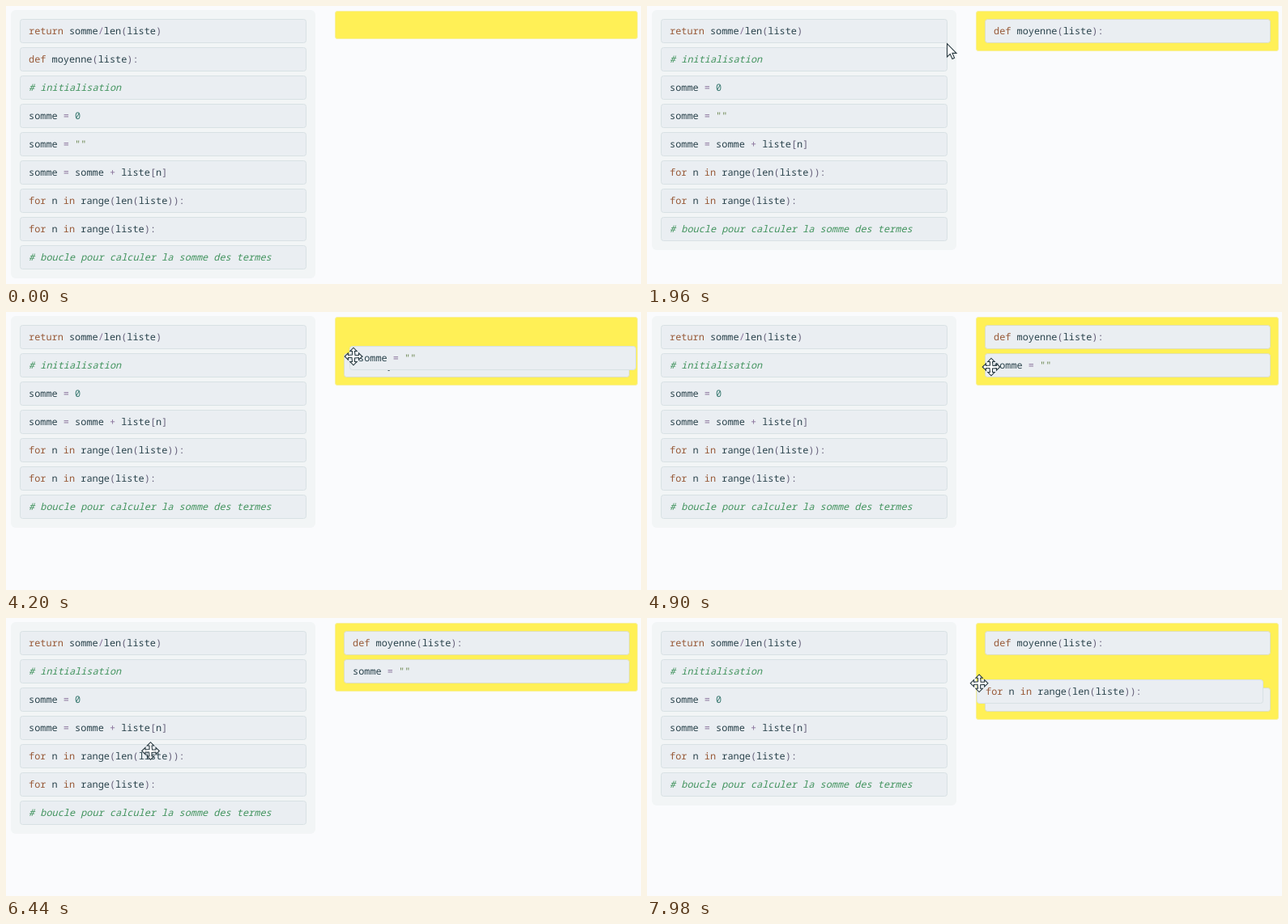
These frames come from a looping animation (784 by 344 pixels, 8 s). An HTML page:

```html
<!DOCTYPE html>
<html lang="fr">
<head>
<meta charset="utf-8">
<title>Puzzle de code</title>
<style>
html, body { margin: 0; width: 100%; height: 100%; overflow: hidden; background: #fafbfd; }
svg { display: block; width: 784px; height: 344px; }
text { font: 11.9px "Noto Sans Mono", "DejaVu Sans Mono", monospace; white-space: pre; fill: #2a434c; text-rendering: geometricPrecision; }
#bank { fill: #f2f5f6; }
#answer { fill: #fff056; stroke: #f8f09c; }
.card { fill: #eaeef2; stroke: #d8e1e4; }
.placed .card { stroke: #dfdfb8; }
.key { fill: #985a38; }
.note { fill: #43945f; font-style: italic; }
.num { fill: #37786f; }
.str { fill: #6b8650; }
.op { fill: #866f98; }
.par { fill: #66607a; }
.cursor { fill: #fff; stroke: #2a3b42; stroke-width: 1.1; }
</style>
</head>
<body>
<svg viewBox="0 0 784 344">
  <rect id="bank" x="6" y="5" width="376" rx="6"/>
  <rect id="answer" x="406.5" y="6.5" width="373" rx="2.5"/>
  <g id="cards"></g>
  <path id="move" class="cursor"/>
  <path id="arrow" class="cursor" d="M.5 .5V17L4.3 13.4L7 19.4L9.6 18.2L7 12.4H12Z"/>
</svg>
<script>
const NS = "http://www.w3.org/2000/svg";
const LOOP = 8000, STEP = 140;
const LEFT = 17, RIGHT = 417, TOP = 16, PITCH = 35, CARD_W = 354, CARD_H = 30;
const SWITCH_X = 230; // a dragged card joins the answer beyond this

const lines = [
  "return somme/len(liste)",
  "def moyenne(liste):",
  "# initialisation",
  "somme = 0",
  'somme = ""',
  "somme = somme + liste[n]",
  "for n in range(len(liste)):",
  "for n in range(liste):",
  "# boucle pour calculer la somme des termes"
];

// Pointer travels: it rests between them; "drag" names the card carried along
const travels = [
  { from: 280, until: 700, x: 24.5, y: 68 },
  { from: 980, until: 1680, x: 432, y: 35, drag: 1 },
  { from: 1680, until: 1960, x: 370, y: 46 },
  { from: 2100, until: 3080, x: 22.5, y: 134.5 },
  { from: 3220, until: 4200, x: 429, y: 55, drag: 4 },
  { from: 4200, until: 4900, x: 425, y: 68, drag: 4 },
  { from: 5320, until: 5740, x: 333.5, y: 156.5 },
  { from: 5740, until: 7140, x: 23.5, y: 172.5 },
  { from: 7140, until: 7280, x: 20.5, y: 160.5 },
  { from: 7420, until: LOOP, x: 411.5, y: 80.5, drag: 6 }
];
const entry = { x: 150, y: 140 };

const $ = id => document.getElementById(id);
const ease = p => p * p * (3 - 2 * p);
const rowY = i => TOP + PITCH * i;
const rowAt = y => Math.floor((y - TOP) / PITCH);
const place = (el, x, y) => el.setAttribute("transform", `translate(${x} ${y})`);

function add(parent, tag, attrs, content = "") {
  const el = document.createElementNS(NS, tag);
  for (const k in attrs) el.setAttribute(k, attrs[k]);
  el.textContent = content;
  return parent.appendChild(el);
}

const tokens = /(?<note>#.*)|(?<str>"[^"]*")|(?<num>\d+)|(?<key>\b(?:return|def|for|in)\b)|(?<op>[=+\/])|(?<par>[()[\]:]+)|(?<plain>\w+|\s+)/g;

const cards = lines.map(line => {
  const g = add($("cards"), "g", {});
  add(g, "rect", { class: "card", x: .5, y: .5, height: CARD_H - 1, rx: 3 });
  const text = add(g, "text", { x: 11, y: 19 });
  for (const m of line.matchAll(tokens)) {
    const kind = Object.keys(m.groups).find(k => m.groups[k] !== undefined);
    add(text, "tspan", { class: kind }, m[0]);
  }
  return g;
});

// One arrowhead, turned four times around the centre
let turn = [[-1.5, -2], [-1.5, -6.5], [-4.2, -6.5], [0, -10.8], [4.2, -6.5], [1.5, -6.5]];
const outline = [];
for (let i = 0; i < 4; i++) {
  outline.push(...turn);
  turn = turn.map(([x, y]) => [-y, x]);
}
$("move").setAttribute("d", "M" + outline.join("L") + "Z");

function pointer(t) {
  let pos = entry;
  for (const m of travels) {
    if (t <= m.from) break;
    const p = ease(Math.min(1, (t - m.from) / (m.until - m.from)));
    pos = { x: pos.x + (m.x - pos.x) * p, y: pos.y + (m.y - pos.y) * p };
  }
  return pos;
}

// Both lists and the carried card at time t
function layout(t) {
  const bank = [...lines.keys()], answer = [];
  let held = null;
  for (const id of new Set(travels.map(m => m.drag))) {
    const own = travels.filter(m => m.drag === id);
    const grab = own[0].from, drop = own[own.length - 1].until;
    if (id === undefined || t < grab) continue;
    const a = pointer(grab), b = pointer(Math.min(t, drop));
    const x = Math.round(LEFT + b.x - a.x);
    const y = Math.round(rowY(bank.indexOf(id)) + b.y - a.y);
    if (t < drop) held = { id, x, y };
    if (x < SWITCH_X) continue;
    bank.splice(bank.indexOf(id), 1);
    answer.splice(Math.max(0, rowAt(y)), 0, id);
  }
  return { bank, answer, held };
}

function overCard({ x, y }, bank, answer) {
  const row = rowAt(y);
  const over = (left, list) => x >= left && x < left + CARD_W && row >= 0 && row < list.length;
  return y - rowY(row) < CARD_H && (over(LEFT, bank) || over(RIGHT, answer));
}

function setCard(id, x, y, placed) {
  const card = cards[id];
  place(card, x, y);
  card.setAttribute("class", placed ? "placed" : "");
  card.firstChild.setAttribute("width", CARD_W - (placed ? 2 : 1));
}

function render(t) {
  const { bank, answer, held } = layout(t);
  $("bank").setAttribute("height", 17 + PITCH * bank.length);
  $("answer").setAttribute("height", answer.length ? 14 + PITCH * answer.length : 34);
  bank.forEach((id, i) => setCard(id, LEFT, rowY(i), false));
  answer.forEach((id, i) => setCard(id, RIGHT, rowY(i), true));
  if (held) {
    setCard(held.id, held.x, held.y, false);
    if (cards[held.id].nextSibling) $("cards").append(cards[held.id]);
  }
  const pos = pointer(t), shown = t >= travels[0].from;
  const moving = held || overCard(pos, bank, answer);
  $("move").style.display = shown && moving ? "" : "none";
  $("arrow").style.display = shown && !moving ? "" : "none";
  place($("move"), pos.x, pos.y);
  place($("arrow"), Math.round(pos.x), Math.round(pos.y));
}

const start = performance.now();
function tick() {
  const t = (performance.now() - start) % LOOP;
  render(Math.floor(t / STEP) * STEP);
  requestAnimationFrame(tick);
}
tick();
</script>
</body>
</html>
```
